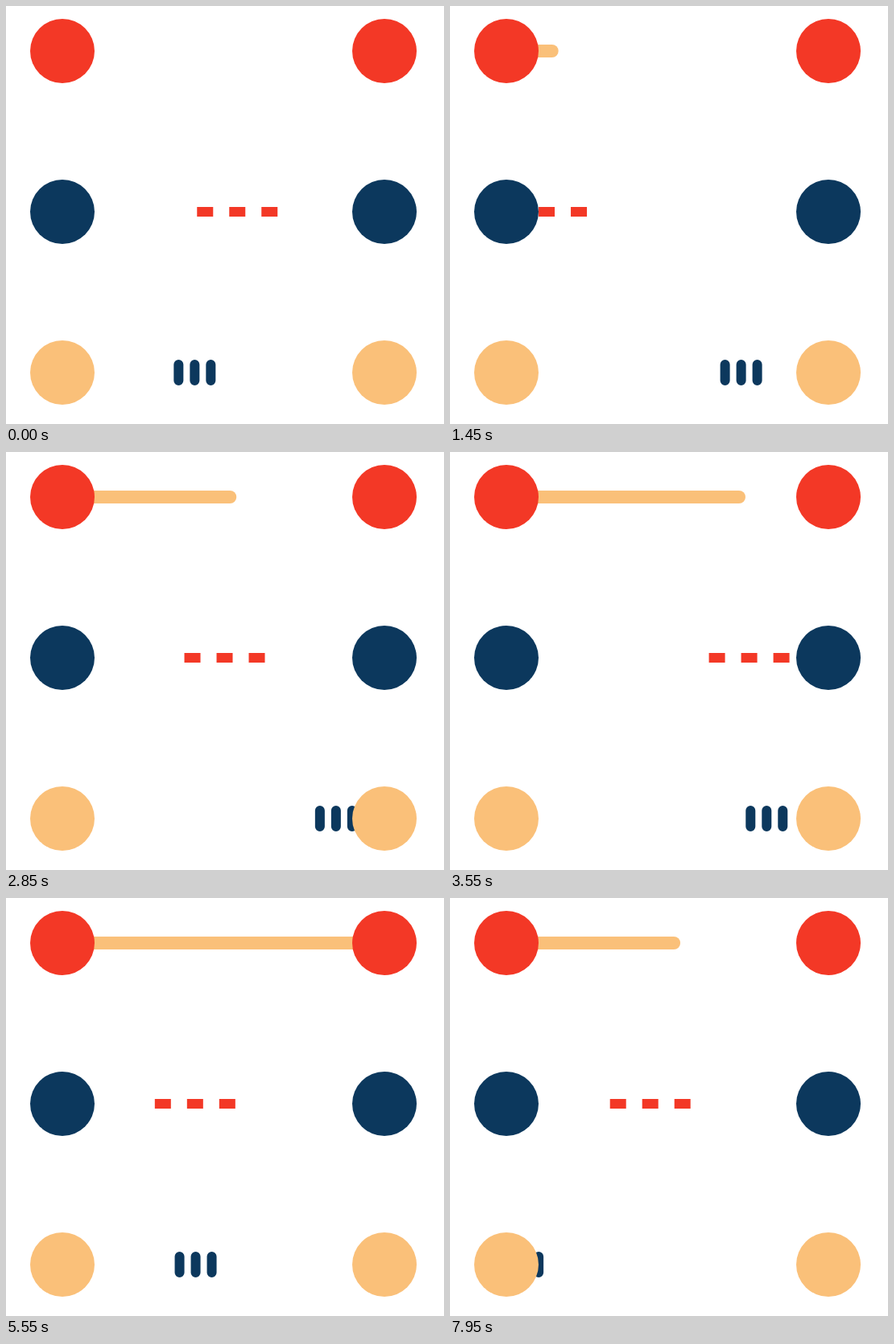
Recreate the animation shown at these times as an HTML page. Size 544 by 520 pixels, loop 8 s.

```html
<!DOCTYPE html>
<html lang="en">
<head>
<meta charset="utf-8">
<title>Sliding links</title>
<style>
  html, body { margin: 0; width: 100%; height: 100%; overflow: hidden; background: #fff; }
  svg { display: block; width: 544px; height: 520px; }
  .red { fill: #f33826; }
  .navy { fill: #0c385d; }
  .sand { fill: #fac079; }
</style>
</head>
<body>
<svg viewBox="0 0 544 520">
  <line id="bar" x1="70" y1="56" y2="56" stroke="#fac079" stroke-width="16" stroke-linecap="round"/>
  <path id="dashes" d="M0 256h20m20 0h20m20 0h20" fill="none" stroke="#f33826" stroke-width="12"/>
  <path id="ticks" d="M0 446v20m20 -20v20m20 -20v20" fill="none" stroke="#0c385d" stroke-width="12" stroke-linecap="round"/>
  <g class="red"><circle cx="70" cy="56" r="40"/><circle cx="470" cy="56" r="40"/></g>
  <g class="navy"><circle cx="70" cy="256" r="40"/><circle cx="470" cy="256" r="40"/></g>
  <g class="sand"><circle cx="70" cy="456" r="40"/><circle cx="470" cy="456" r="40"/></g>
</svg>
<script>
  const LOOP = 8000;
  const PHASE = -0.098;
  const [bar, dashes, ticks] = ["bar", "dashes", "ticks"].map(id => document.getElementById(id));

  const slide = (el, x) => el.setAttribute("transform", `translate(${x.toFixed(3)} 0)`);

  function draw(ms) {
    const a = 0.6 * (ms % LOOP) / 1000 + PHASE;
    bar.setAttribute("x2", (270 - 200 * Math.cos(a)).toFixed(3));
    slide(dashes, 210 - 140 * Math.sin(2 * a));
    slide(ticks, 230 + 160 * Math.sin(a));
  }

  let start;
  function tick(now) {
    start ??= now;
    draw(now - start);
    requestAnimationFrame(tick);
  }

  draw(0);
  requestAnimationFrame(tick);
</script>
</body>
</html>
```
